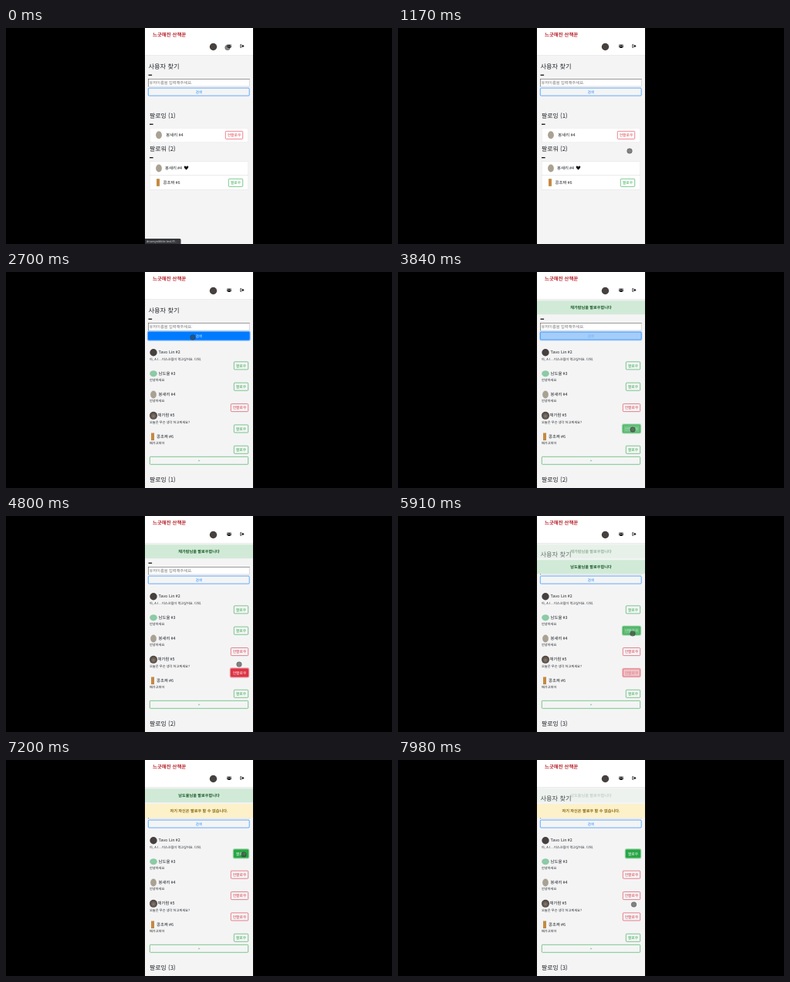
These frames come from a looping animation (500 by 281 pixels, 8000 ms). An HTML page with a canvas:

```html
<!DOCTYPE html>
<html lang="ko">
<head>
<meta charset="utf-8">
<style>
html, body { margin: 0; width: 100%; height: 100%; overflow: hidden; background: #000; }
canvas { display: block; width: 500px; height: 281px; }
</style>
</head>
<body>
<canvas id="stage"></canvas>
<script>
const W = 500, H = 281, LOOP = 8000;
const RED = '#dc3545', GREEN = '#28a745', BLUE = '#007bff', INK = '#212529';
const canvas = document.getElementById('stage');
const ctx = canvas.getContext('2d');
const dpr = window.devicePixelRatio || 1;
canvas.width = W * dpr;
canvas.height = H * dpr;

const SEARCH_TAP = 2500, LIST_AT = 2600;
const TAP_A = 3740, TAP_B = 5800, TAP_C = 6930;

const people = [
  { name: 'Tavo Lin', no: 2, x: 197.5, note: '아, A I ...이스크림이 먹고싶어요. 더워.', pic: 'dark', tap: TAP_C },
  { name: '남도율', no: 3, x: 197.5, note: '안녕하세요', pic: 'mint', tap: TAP_B, blur: TAP_C, done: 5830, red: 5960 },
  { name: '봉새리', no: 4, x: 197.5, note: '안녕하세요', pic: 'sand', done: 0, red: 0 },
  { name: '채가람', no: 5, x: 196.5, note: '오늘은 무슨 생각 하고계세요?', pic: 'photo', tap: TAP_A, blur: TAP_B, done: 3790, red: 3900 },
  { name: '콩초짜', no: 6, x: 195, note: '배가고파아', pic: 'amber' }
];

const ok = { bg: '#d1ead7', ink: '#155724' };
const warn = { bg: '#fcf1c9', ink: '#856404' };
const LIFE = 2030, FADE = 150;
const alerts = [
  { at: 3790, text: '채가람님을 팔로우합니다', look: ok },
  { at: 5830, text: '남도율님을 팔로우합니다', look: ok },
  { at: 7020, text: '자기 자신은 팔로우 할 수 없습니다.', look: warn }
];

// time, x, y
const path = [
  [0, 287, 25.5], [390, 287, 25.5], [900, 303, 157], [1140, 300, 160],
  [1400, 300, 160], [1590, 248, 98], [1760, 248, 98], [2280, 242, 85],
  [3290, 242, 85], [3640, 304, 205], [4490, 304, 205], [4790, 302, 193],
  [4950, 302, 193], [5190, 303, 183], [5300, 303, 183], [5490, 304, 153],
  [6440, 304, 153], [6720, 308, 123], [7670, 308, 123], [7970, 305.5, 188]
];

const ramp = (t, start, len) => Math.max(0, Math.min(1, (t - start) / len));
const ease = u => u * u * (3 - 2 * u);
const pressed = (t, tap = Infinity, blur = Infinity) => ramp(t, tap, 150) * (1 - ramp(t, blur, 150));

function rect(x, y, w, h, color) {
  ctx.fillStyle = color;
  ctx.fillRect(x, y, w, h);
}

function round(x, y, w, h, r) {
  ctx.beginPath();
  ctx.roundRect(x, y, w, h, r);
}

function oval(x, y, rx, ry, color) {
  ctx.fillStyle = color;
  ctx.beginPath();
  ctx.ellipse(x, y, rx, ry, 0, 0, 7);
  ctx.fill();
}

// y is the visual middle of the line; returns the end x
function text(str, x, y, size, color = INK, weight = 400, align = 'left') {
  ctx.font = `${weight} ${size}px "Noto Sans CJK KR", "Noto Sans CJK", sans-serif`;
  ctx.textAlign = align;
  ctx.fillStyle = color;
  ctx.fillText(str, x, y + size * 0.37);
  return x + ctx.measureText(str).width;
}

function button(x, y, w, h, label, color, on = 0, size = 4.8) {
  ctx.save();
  if (on > 0) {
    ctx.globalAlpha = on * 0.45;
    ctx.strokeStyle = color;
    ctx.lineWidth = 1.3;
    round(x - 0.6, y - 0.6, w + 1.2, h + 1.2, 1.6);
    ctx.stroke();
    ctx.globalAlpha = on;
    ctx.fillStyle = color;
    round(x, y, w, h, 1);
    ctx.fill();
    ctx.globalAlpha = 1;
  }
  ctx.strokeStyle = color;
  ctx.lineWidth = 0.6;
  round(x + 0.3, y + 0.3, w - 0.6, h - 0.6, 1);
  ctx.stroke();
  const cx = x + w / 2, cy = y + h / 2;
  ctx.globalAlpha = 1 - on;
  text(label, cx, cy, size, color, 400, 'center');
  ctx.globalAlpha = on;
  text(label, cx, cy, size, '#fff', 400, 'center');
  ctx.restore();
}

// right edge stays fixed while the label changes
function followButton(right, y, following, color, on) {
  const w = following ? 23 : 19;
  button(right - w, y, w, 10.7, following ? '언팔로우' : '팔로우', color, on);
}

function avatar(kind, x, y) {
  if (kind === 'dark') oval(x, y, 4.7, 4.7, '#46403f');
  if (kind === 'mint') oval(x, y, 4.8, 4, '#8ccba6');
  if (kind === 'sand') oval(x, y, 3.9, 5, '#a9a293');
  if (kind === 'amber') rect(x - 2, y - 4.8, 4, 9.6, '#c48a42');
  if (kind === 'photo') {
    const g = ctx.createRadialGradient(x, y + 1, 0.5, x, y, 5);
    g.addColorStop(0, '#85786d');
    g.addColorStop(1, '#49413b');
    oval(x, y, 5, 5, g);
  }
}

function nameTag(name, no, x, y, weight) {
  const end = text(name, x, y, 5.4, INK, weight);
  return text(' #' + no, end, y, 5.4);
}

function bar(x, y) {
  rect(x, y, 4.6, 1.3, '#111');
}

function heading(label, count, y) {
  text(`${label} (${count})`, 186, y, 7.9);
}

function card(y, h) {
  rect(186, y, 128, h, '#dedede');
  rect(186.4, y + 0.4, 127.2, h - 0.8, '#fff');
}

function heart(x, y) {
  ctx.fillStyle = '#111';
  ctx.beginPath();
  ctx.moveTo(x, y + 2.6);
  ctx.bezierCurveTo(x - 5.2, y - 1.4, x - 1.8, y - 4.2, x, y - 1.4);
  ctx.bezierCurveTo(x + 1.8, y - 4.2, x + 5.2, y - 1.4, x, y + 2.6);
  ctx.fill();
}

function groupIcon(x, y) {
  for (const s of [-1, 1]) {
    oval(x + s * 2, y - 1.2, 0.8, 0.8, '#111');
    rect(x + s * 2.1 - 0.9, y, 1.8, 1.4, '#111');
  }
  oval(x, y - 0.9, 1.2, 1.2, '#111');
  ctx.fillStyle = '#111';
  round(x - 1.8, y + 0.6, 3.6, 1.9, 0.8);
  ctx.fill();
}

function exitIcon(x, y) {
  ctx.strokeStyle = '#111';
  ctx.lineWidth = 0.8;
  ctx.beginPath();
  ctx.moveTo(x - 0.8, y - 1.9);
  ctx.lineTo(x - 2.2, y - 1.9);
  ctx.lineTo(x - 2.2, y + 1.9);
  ctx.lineTo(x - 0.8, y + 1.9);
  ctx.stroke();
  rect(x - 1, y - 0.6, 1.8, 1.2, '#111');
  ctx.beginPath();
  ctx.moveTo(x + 0.4, y - 2);
  ctx.lineTo(x + 2.5, y);
  ctx.lineTo(x + 0.4, y + 2);
  ctx.fill();
}

function drawHeader() {
  rect(180, 35, 140, 1, '#ececec');
  rect(180, 0, 140, 35, '#fff');
  text('느긋해진 산책꾼', 190, 9, 6.45, '#b8232b', 700);
  avatar('dark', 268.5, 24.5);
  groupIcon(289, 23.5);
  exitIcon(306, 23.5);
}

function drawSearch(t) {
  text('사용자 찾기', 184.5, 50, 8.2);
  bar(184.5, 60.6);
  rect(184, 66, 131.5, 10.3, '#c9c9c9');
  rect(184, 66, 131.5, 0.8, '#6e6e6e');
  rect(184, 66, 0.8, 10.3, '#6e6e6e');
  rect(184.8, 66.8, 130.1, 8.9, '#fff');
  text('유저이름을 입력해주세요.', 185.4, 71.3, 5.25, '#757575');
  button(184, 77.8, 131.5, 10.6, '검색', BLUE, pressed(t, SEARCH_TAP, TAP_A), 4.4);
}

function drawFollows() {
  heading('팔로잉', 1, 114);
  bar(186, 124.6);
  card(130, 19);
  avatar('sand', 198, 139.3);
  nameTag('봉새리', 4, 207.3, 139, 400);
  followButton(307, 134, true, RED, 0);
  heading('팔로워', 2, 157.3);
  bar(186, 168);
  card(173.3, 18.7);
  avatar('sand', 198, 182.5);
  nameTag('봉새리', 4, 206, 182, 400);
  heart(233.5, 182);
  card(191.6, 19);
  avatar('amber', 197, 201);
  nameTag('콩초짜', 6, 203.5, 201, 400);
  followButton(307, 196, false, GREEN, 0);
}

function drawResults(t) {
  people.forEach((p, i) => {
    const y = 104.4 + i * 27.35;
    avatar(p.pic, p.pic === 'amber' ? 190 : 191, y + 0.4);
    nameTag(p.name, p.no, p.x, y, 500);
    text(p.note, 186, y + 8.8, 4.22);
    followButton(314, y + 12.1, t >= p.done, t >= p.red ? RED : GREEN, pressed(t, p.tap, p.blur));
  });
  button(186, 240, 128, 10.6, '+', GREEN, 0, 4.6);
  const count = 1 + (t >= people[3].done) + (t >= people[1].done);
  heading('팔로잉', count, 270);
}

function drawAlerts(t) {
  const live = alerts.filter(a => t >= a.at && t < a.at + LIFE + FADE);
  live.forEach((a, i) => {
    const y = 37.2 + i * 20;
    ctx.globalAlpha = 1 - ramp(t, a.at + LIFE, FADE);
    rect(180, y, 140, 18, a.look.bg);
    text(a.text, 250, y + 9, 5.15, a.look.ink, 700, 'center');
    ctx.globalAlpha = 1;
  });
}

function drawStatus(t) {
  ctx.globalAlpha = 1 - ramp(t, 210, 160);
  ctx.fillStyle = '#36373a';
  round(179.5, 274, 47, 8, [0, 1.5, 0, 0]);
  ctx.fill();
  ctx.font = '4px Roboto, sans-serif';
  ctx.textAlign = 'left';
  ctx.fillStyle = '#c8c9cc';
  ctx.fillText('drowsynibbler.test/fl...', 182, 279.4);
  ctx.globalAlpha = 1;
}

function drawCursor(t) {
  const alpha = t < 600 ? 1 - ramp(t, 180, 150) : ramp(t, 900, 150);
  if (!alpha) return;
  let k = 0;
  while (k < path.length - 1 && path[k + 1][0] <= t) k++;
  const a = path[k], b = path[k + 1] || a;
  const u = a === b ? 0 : ease(ramp(t, a[0], b[0] - a[0]));
  const x = a[1] + (b[1] - a[1]) * u, y = a[2] + (b[2] - a[2]) * u;
  ctx.globalAlpha = alpha;
  oval(x, y, 3.3, 3.3, 'rgba(60,60,60,.62)');
  ctx.strokeStyle = 'rgba(40,40,40,.55)';
  ctx.lineWidth = 0.6;
  ctx.stroke();
  ctx.globalAlpha = 1;
}

function draw(t) {
  ctx.setTransform(dpr, 0, 0, dpr, 0, 0);
  ctx.textRendering = 'geometricPrecision';
  rect(0, 0, W, H, '#000');
  ctx.save();
  ctx.beginPath();
  ctx.rect(180, 0, 140, H);
  ctx.clip();
  rect(180, 0, 140, H, '#f4f4f5');
  drawHeader();
  drawSearch(t);
  if (t < LIST_AT) drawFollows();
  else drawResults(t);
  drawAlerts(t);
  drawStatus(t);
  drawCursor(t);
  ctx.restore();
}

const start = performance.now();
function tick() {
  draw((performance.now() - start) % LOOP);
  requestAnimationFrame(tick);
}
tick();
</script>
</body>
</html>
```
